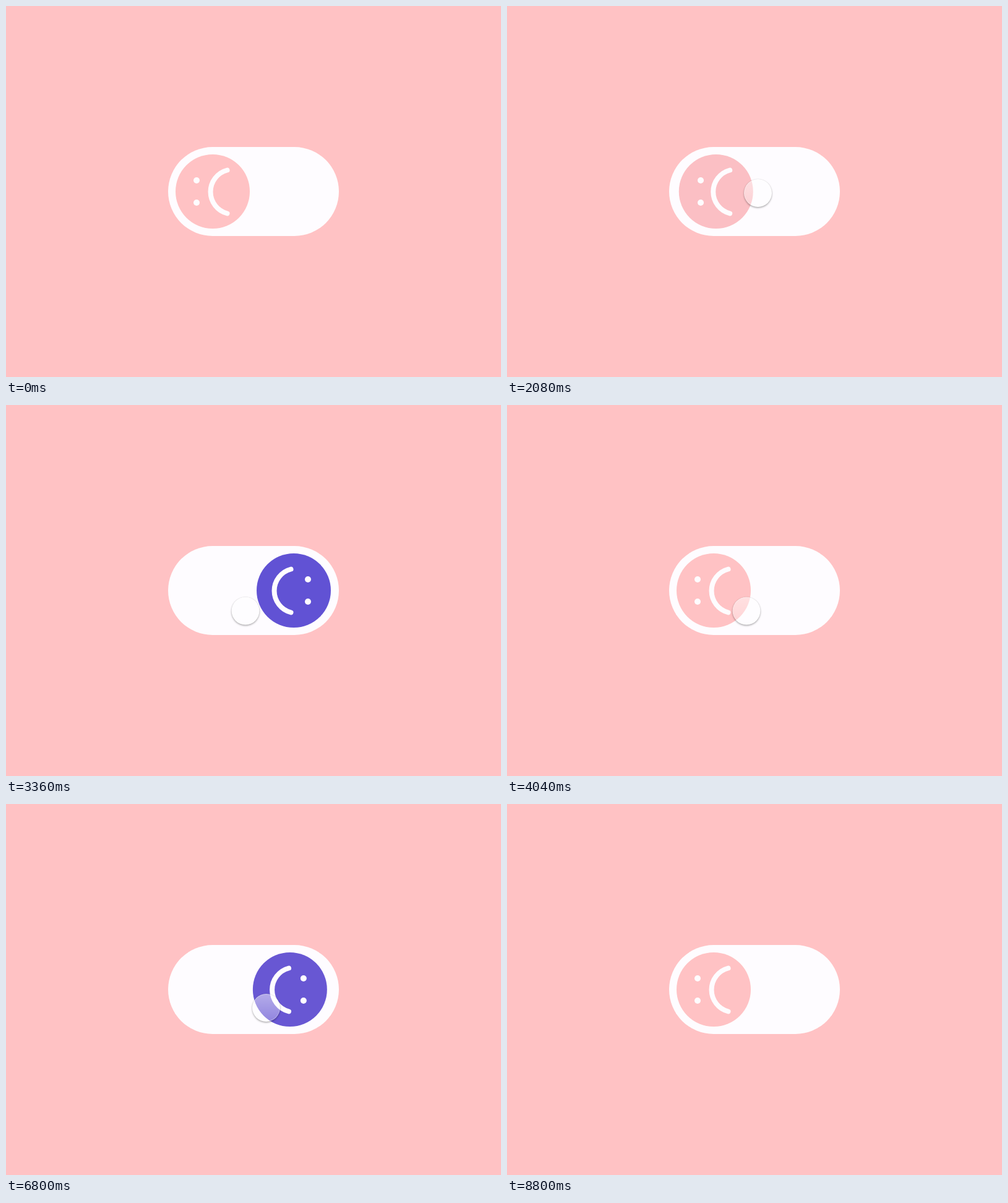
An HTML page for the animation above (9080 ms loop, 800 by 600 pixels).

```html
<!DOCTYPE html>
<html lang="en">
<head>
<meta charset="utf-8">
<title>Mood toggle</title>
<style>
  html, body { margin: 0; width: 100%; height: 100%; overflow: hidden; background: #ffc2c4; }
  svg { position: absolute; left: 0; top: 0; }
  #cursor {
    position: absolute; left: -22.5px; top: -22.5px; width: 45px; height: 45px;
    border-radius: 50%;
    background: linear-gradient(rgba(255,255,255,.5), rgba(255,255,255,.27));
    box-shadow: 0 1.5px 3px rgba(0,0,0,.32), 0 0 1px rgba(0,0,0,.22),
                inset 0 0 0 1px rgba(255,255,255,.3);
  }
</style>
</head>
<body>
<svg width="800" height="600" viewBox="0 0 800 600">
  <rect x="262" y="228" width="276" height="144" rx="72" fill="#fefcff"/>
  <circle id="knob" cx="334" cy="300" r="60"/>
  <g id="eyes" fill="#fefcff">
    <circle cx="308" cy="282" r="5"/>
    <circle cx="308" cy="318" r="5"/>
  </g>
  <path id="mouth" d="M357.5 265.5A36.2 36.2 0 0 0 357.5 335.5" fill="none"
        stroke="#fefcff" stroke-width="8" stroke-linecap="round"/>
</svg>
<div id="cursor"></div>
<script>
const LOOP = 9080, STEP = 40;
const PINK = [255, 194, 196], PURPLE = [97, 82, 212];
const TRAVEL = { knob: 131, eyes: 180, mouth: 103 };

// Each flip: start time, end state, then duration per part
const flips = [
  { at: 2040, to: 1, knob: 880, eyes: 400, mouth: 940, tint: 400 },
  { at: 3490, to: 0, knob: 420, eyes: 470, mouth: 530, tint: 420 },
  { at: 5080, to: 1, knob: 870, eyes: 400, mouth: 935, tint: 400 },
  { at: 6765, to: 0, knob: 550, eyes: 615, mouth: 690, tint: 550 }
];

// Cursor moves: start, end, from, to
const moves = [
  [1080, 1920, [418, 630], [405, 302], ease],
  [2980, 3360, [405, 302], [386.5, 332.5], smooth],
  [4500, 4920, [386.5, 332.5], [420, 329], smooth],
  [7900, 8800, [420, 329], [360, 630], smooth]
];

const $ = id => document.getElementById(id);
const clamp = x => Math.min(1, Math.max(0, x));
const mix = (a, b, p) => a + (b - a) * p;

function smooth(x) { return x * x * (3 - 2 * x); }

// cubic-bezier(.25, .1, .25, 1)
function ease(x) {
  if (x <= 0 || x >= 1) return clamp(x);
  const bez = (a, b, s) => 3 * a * s * (1 - s) ** 2 + 3 * b * s * s * (1 - s) + s ** 3;
  let lo = 0, hi = 1;
  for (let i = 0; i < 24; i++) {
    const mid = (lo + hi) / 2;
    if (bez(.25, .25, mid) < x) lo = mid; else hi = mid;
  }
  return bez(.1, 1, lo);
}

function progress(part, t) {
  const flip = flips.filter(f => f.at <= t).pop();
  if (!flip) return 0;
  const quick = flip.to && (part === 'eyes' || part === 'tint');
  const p = (quick ? smooth : ease)(clamp((t - flip.at) / flip[part]));
  return flip.to ? p : 1 - p;
}

function draw(now) {
  const t = Math.floor(now % LOOP / STEP) * STEP;
  for (const part in TRAVEL)
    $(part).setAttribute('transform', `translate(${TRAVEL[part] * progress(part, t)} 0)`);
  const tint = progress('tint', t);
  $('knob').setAttribute('fill', `rgb(${PINK.map((c, i) => Math.round(mix(c, PURPLE[i], tint)))})`);

  const [start, end, from, to, curve] = moves.filter(m => m[0] <= t).pop() || moves[0];
  const p = curve(clamp((t - start) / (end - start)));
  $('cursor').style.transform = `translate(${mix(from[0], to[0], p)}px, ${mix(from[1], to[1], p)}px)`;
}

function tick() {
  draw(performance.now());
  requestAnimationFrame(tick);
}
tick();
</script>
</body>
</html>
```
